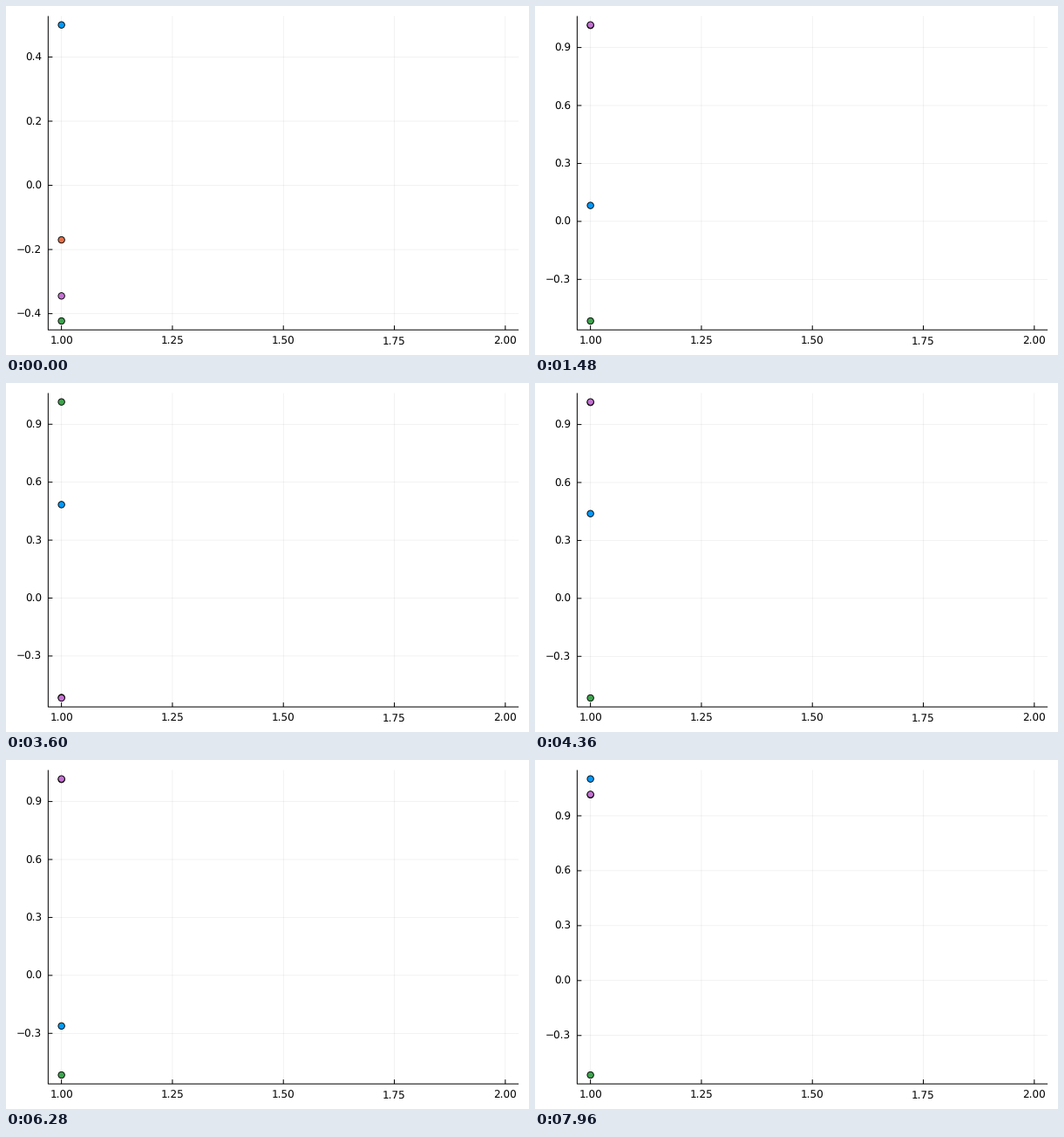
A matplotlib script for the animation above (8000 ms loop, 600 by 400 pixels).

```python
import numpy as np
import matplotlib.pyplot as plt
from matplotlib.animation import FuncAnimation
from matplotlib.patches import Circle

W, H, DPI = 600, 400, 100
FRAMES, STEP_MS = 200, 40
LEFT, RIGHT, TOP, BOTTOM = 48.35, 588.1, 11.5, 371.2
PX = 72 / DPI  # one pixel in points
COLORS = ["#009afa", "#e36f47", "#3ea44e", "#c371d2"]

# drifting series: (frame, value, slope)
DRIFT = [(0, 0.5, 0), (37, 0.0826, 0), (61, 0.3806, 0.0076), (90, 0.4838, 0),
         (127, 0.2970, -0.011), (157, -0.2619, 0), (199, 1.1015, 0.045)]
# flipping series: start value, centre, signed swing on even frames
FLIPS = [(-0.170, 0.2498, -0.7648),
         (-0.4228, 0.24995, 0.7656),
         (-0.3447, 0.24985, -0.7672)]


def drift(n):
    for (a, p, u), (b, q, v) in zip(DRIFT, DRIFT[1:]):
        if n <= b:
            d = b - a
            t = (n - a) / d
            return (p * (1 + 2 * t) * (1 - t) ** 2 + q * t * t * (3 - 2 * t)
                    + d * u * t * (1 - t) ** 2 - d * v * t * t * (1 - t))
    return DRIFT[-1][1]


def flip(n, start, mid, swing):
    amp = swing + (start - mid - swing) * np.exp(-n / 4)
    return mid + (-1) ** n * amp


def values(n):
    return np.array([drift(n)] + [flip(n, *f) for f in FLIPS])


def nice_ticks(lo, hi):
    def count(s):
        return np.floor(hi / s) - np.ceil(lo / s) + 1
    step = min((0.1, 0.2, 0.3, 0.5, 0.25), key=lambda s: abs(count(s) - 5))
    ticks = np.arange(np.ceil(lo / step), np.floor(hi / step) + 1) * step
    return step, ticks


def tick_text(v, step):
    s = f"{v:.2f}" if step == 0.25 else f"{v:.1f}"
    return s.replace("-", "\u2212") if float(s) else s.lstrip("-")


plt.rcParams["font.family"] = "DejaVu Sans"
plt.rcParams["text.hinting"] = "none"
fig = plt.figure(figsize=(W / DPI, H / DPI), dpi=DPI, facecolor="white")
ax = fig.add_axes([0, 0, 1, 1])
ax.set_xlim(0, W)
ax.set_ylim(H, 0)
ax.axis("off")


def line(width=1, alpha=1, z=2):
    return ax.plot([], [], color="black", alpha=alpha, lw=width * PX, zorder=z,
                   solid_capstyle="butt", snap=False)[0]


def label(ha):
    return ax.text(0, 0, "", ha=ha, va="baseline", fontsize=12 * PX)


def tick_set(count, ha):
    return [(line(0.5, 0.1, 1), line(), label(ha)) for _ in range(count)]


def sx(v):
    return LEFT + (v - 0.97) / 1.06 * (RIGHT - LEFT)


for i, (grid, mark, text) in enumerate(tick_set(5, "center")):
    v = 1 + i / 4
    x = sx(v)
    grid.set_data([x, x], [TOP, BOTTOM])
    mark.set_data([x, x], [BOTTOM, BOTTOM - 5])
    text.set_position((x, 387.4))
    text.set_text(f"{v:.2f}")

y_ticks = tick_set(14, "right")
line().set_data([LEFT, LEFT, RIGHT], [TOP, BOTTOM, BOTTOM])
dots = [ax.add_patch(Circle((sx(1), 0), 3.7, fc=c, ec="black", lw=0.9 * PX,
                            zorder=4 + i)) for i, c in enumerate(COLORS)]


def draw(n):
    vals = values(n)
    lo, hi = vals.min(), vals.max()
    pad = 0.03 * (hi - lo)
    lo, hi = lo - pad, hi + pad
    step, ticks = nice_ticks(lo, hi)

    def sy(v):
        return BOTTOM - (v - lo) / (hi - lo) * (BOTTOM - TOP)

    for i, parts in enumerate(y_ticks):
        shown = i < len(ticks)
        for p in parts:
            p.set_visible(shown)
        if shown:
            grid, mark, text = parts
            y = sy(ticks[i])
            grid.set_data([LEFT, RIGHT], [y, y])
            mark.set_data([LEFT, LEFT + 5], [y, y])
            text.set_position((LEFT - 7.4, y + 4.4))
            text.set_text(tick_text(ticks[i], step))

    for dot, v in zip(dots, vals):
        dot.center = (sx(1), sy(v))
    return dots


anim = FuncAnimation(fig, draw, frames=FRAMES, interval=STEP_MS,
                     init_func=lambda: draw(0), repeat=True, repeat_delay=0,
                     blit=False)
plt.show()
```
